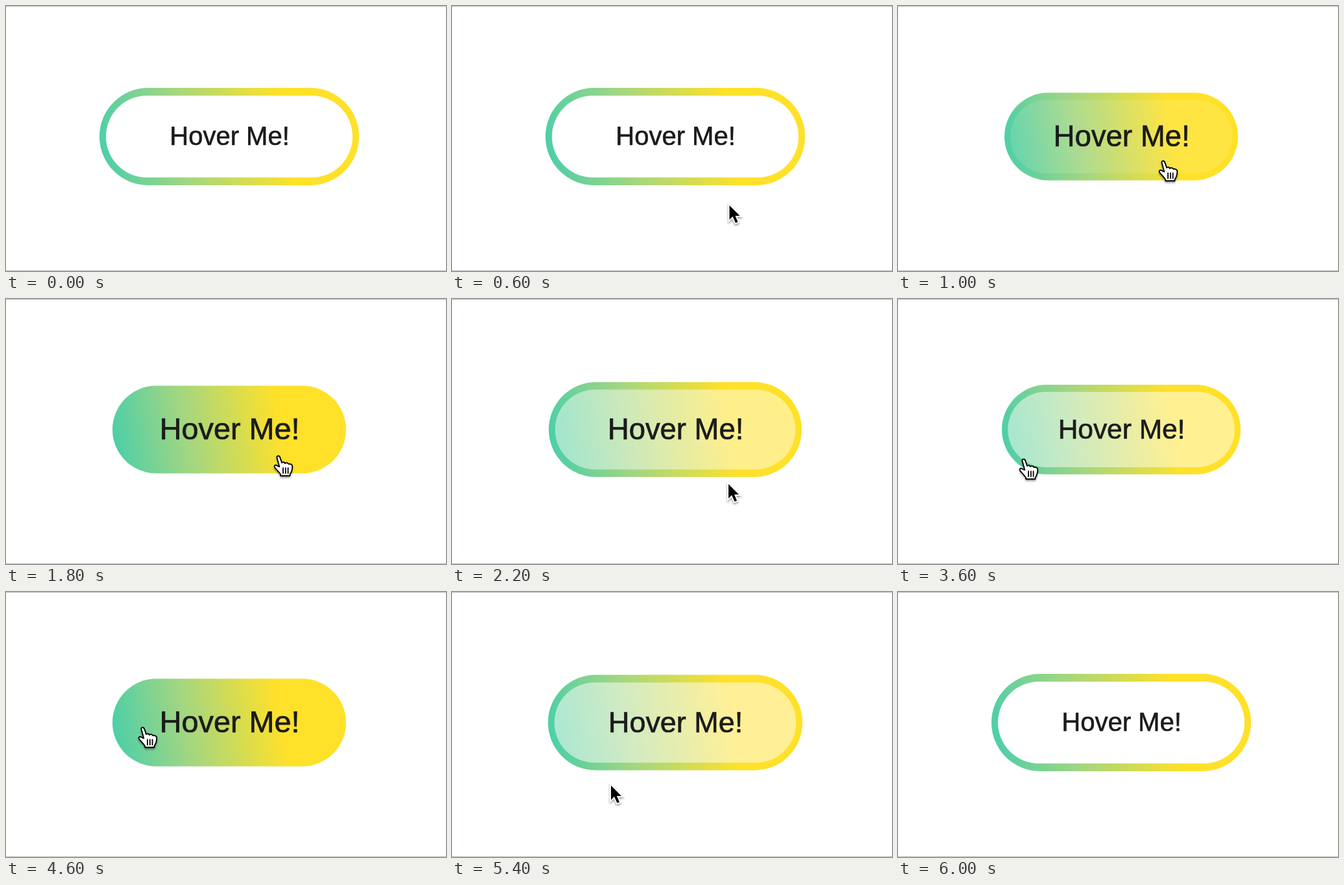
These frames come from a looping animation (678 px wide and 408 px high, 6200 ms). An HTML page:

```html
<!DOCTYPE html>
<html lang="en">
<head>
<meta charset="utf-8">
<style>
  html, body { margin: 0; width: 100%; height: 100%; overflow: hidden; background: #fff; }
  svg { display: block; }
  text { font: 40px "Liberation Sans", Arial, sans-serif; fill: #1b1b1b; stroke: #1b1b1b; stroke-width: .6; text-anchor: middle; }
  #cursor { filter: drop-shadow(0 2px 1.5px rgba(0, 0, 0, .4)); }
</style>
</head>
<body>
<svg width="678" height="408" viewBox="0 0 678 408">
  <defs>
    <linearGradient id="fade" gradientUnits="userSpaceOnUse" x1="-207" y1="36.5" x2="207" y2="-36.5">
      <stop offset="0" stop-color="#45ceab"/>
      <stop offset=".32" stop-color="#a2d682"/>
      <stop offset=".71" stop-color="#ffe12a"/>
    </linearGradient>
  </defs>
  <path d="M0 .5H678M0 407.5H678" stroke="#b8b8b8"/>
  <g id="button">
    <rect x="-200" y="-75" width="400" height="150" rx="75" fill="url(#fade)"/>
    <rect id="cover" x="-190" y="-63" width="380" height="126" rx="63" fill="#fff"/>
    <g id="label"><text x=".5" y="13.2">Hover Me!</text></g>
  </g>
  <g id="cursor">
    <path id="arrow" d="M1 3V25L6 20L10.5 30L14 28.5L10 19H17Z" stroke="#fff" stroke-width="4" paint-order="stroke"/>
    <g id="hand" transform="translate(-.6 -.8) scale(.95 1)" stroke="#000" stroke-width="1.9" stroke-linejoin="round" stroke-linecap="round">
      <path fill="#fff" d="M-2 1C-3-2 2-3 3 1L6 9C7 7 11 8 11 10C13 8 16 9 17 11C20 10 23 12 23 14C23 20 22 23 19 27V29H4V27C1 23-2 20-5 17C-8 13-4 11-1 14L2 15Z"/>
      <path fill="none" d="M8 17V25M12 17V25M16 17V25"/>
    </g>
  </g>
</svg>
<script>
const LOOP = 6200, STEP = 200;
const hovers = [[700, 2065], [3450, 5250]];
// cursor key points: time, x, y
const path = [
  [200, 444, 367], [1000, 409, 241], [1800, 420, 244], [2200, 425, 282], [2600, 325, 315],
  [3000, 178, 304], [3600, 194, 249], [4600, 211, 211], [5200, 238, 258], [5800, 256, 369]
];
const el = id => document.getElementById(id);
const show = (node, on) => node.setAttribute("display", on ? "inline" : "none");
const place = (node, value) => node.setAttribute("transform", value);

// cubic-bezier(.25, .1, .25, 1)
function ease(x) {
  if (x <= 0) return 0;
  if (x >= 1) return 1;
  let lo = 0, hi = 1, u;
  for (let i = 0; i < 20; i++) {
    u = (lo + hi) / 2;
    const bx = .75 * u * (1 - u) + u ** 3;
    if (bx < x) lo = u; else hi = u;
  }
  return .3 * u * (1 - u) ** 2 + 3 * u * u * (1 - u) + u ** 3;
}

const progress = (t, duration) => hovers.reduce((sum, [enter, leave]) =>
  sum + ease((t - enter) / duration) - ease((t - leave) / duration), 0);

function cursorAt(t) {
  const i = path.findIndex(([time]) => time > t);
  if (i === 0 || t > path.at(-1)[0]) return null;
  if (i < 0) return path.at(-1).slice(1);
  const [a, b] = [path[i - 1], path[i]];
  const k = (t - a[0]) / (b[0] - a[0]);
  return [1, 2].map(j => a[j] + (b[j] - a[j]) * k);
}

function draw(now) {
  const t = Math.floor((now - start) % LOOP / STEP) * STEP;
  const fill = progress(t, 500);
  place(el("button"), `translate(344 201) scale(${1 - .1 * progress(t, 300)})`);
  place(el("label"), `scale(${1 + .3 * fill})`);
  el("cover").setAttribute("opacity", 1 - fill);

  const point = cursorAt(t);
  const over = hovers.some(([enter, leave]) => t >= enter && t < leave);
  show(el("cursor"), point);
  show(el("hand"), over);
  show(el("arrow"), !over);
  if (point) place(el("cursor"), `translate(${point})`);
  requestAnimationFrame(draw);
}
const start = performance.now();
draw(start);
</script>
</body>
</html>
```
